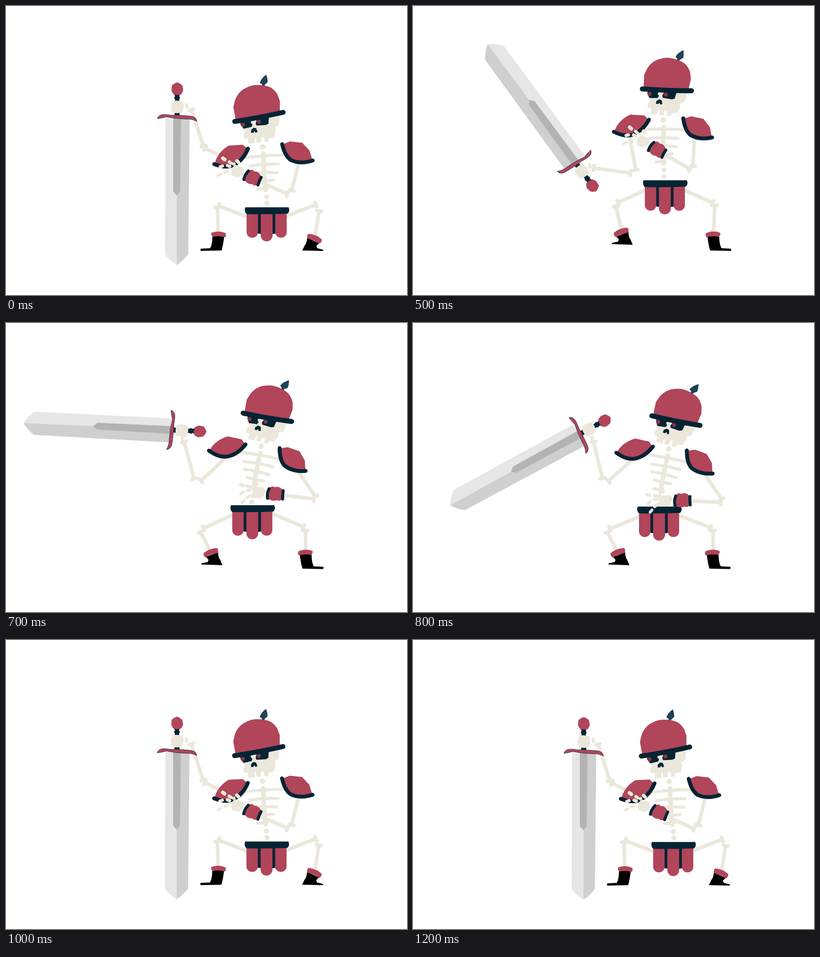
Recreate the animation shown at these times as an HTML page. Size 880 px wide and 636 px high, loop 1.3 s.

```html
<!DOCTYPE html>
<html lang="en">
<head>
<meta charset="utf-8">
<title>Skeleton knight</title>
<style>
  html, body { margin: 0; height: 100%; overflow: hidden; background: #fff; }
  svg { display: block; width: 100vw; height: 100vh; }
  .bone { fill: #ebe7db; }
  .line, .bones { fill: none; stroke: #ebe7db; stroke-width: 7; stroke-linecap: round; stroke-linejoin: round; }
  .bones { stroke-width: 8; }
  .red { fill: #b1455a; }
  .navy { fill: #042434; }
  .trim { fill: none; stroke: #042434; stroke-width: 8.5; stroke-linecap: round; stroke-linejoin: round; }
</style>
</head>
<body>
<!-- data-pose on a group: x y [angle [mirror]]; on a bone: x1 y1 x2 y2. The first pose is the drawn one. -->
<svg viewBox="0 0 880 636">
<g id="knight">
  <!-- legs -->
  <path class="bones" data-pose="540 468 467 440|525 404 461 429|510 399 439 436|505 419 433 452|502 428 431 454"/>
  <path class="bones" data-pose="464 443 466 500|456 438 461 497|434 444 454 488|427 460 449 503|426 460 448 503"/>
  <path class="bones" data-pose="605 466 680 437|593 404 658 432|582 400 657 434|576 416 653 449|576 425 653 452"/>
  <path class="bones" data-pose="687 451 678 508|661 438 659 497|663 440 661 497|657 457 658 505|659 456 660 505"/>

  <g data-pose="466.5 502|657 502 0 -1|660 502 0 -1|657 504.5 0 -1|657 504.5 0 -1">
    <path d="M453 505H479Q477 525 473 538L428 539Q425 536 428 534L448 533Q453 525 453 505Z"/>
    <path class="red" d="M451 499Q466 493 482 500Q484 505 481 509Q467 505 454 508Q449 504 451 499Z"/>
  </g>
  <g data-pose="677 511|460 503 3 -1|453.5 491 3 -1|449.5 504.5 3 -1|449.5 504.5 3 -1">
    <path d="M661 510L687 522L681 528L683 533L695 536Q698 538 695 539L650 538L656 526Q660 522 661 510Z"/>
    <path class="red" d="M664 501Q682 503 693 514Q693 520 688 523Q677 515 662 512Q659 505 664 501Z"/>
  </g>

  <!-- torso -->
  <g data-pose="564 322|548 262|551 264 8|558 283 14|560 295 15.5">
    <path class="line" style="stroke-width:10" d="M565 325Q565 365 570 405"/>
    <path class="line" style="stroke-width:6.5" d="M523 334Q565 328 610 328M535 352Q570 347 598 348M540 368Q570 365 595 367M550 384Q570 385 587 383M553 403L574 401"/>
    <circle class="bone" cx="563" cy="310" r="6"/>
    <circle class="bone" cx="572" cy="420" r="5.5"/>
    <circle class="bone" cx="573" cy="434" r="5.5"/>
  </g>

  <!-- upper arms -->
  <path class="bones" data-pose="490 340 437 313|483 286 498 374|466 276 480 348|484 295 428 347|484 301 429 349"/>
  <path class="bones" data-pose="645 335 627 406|609 271 592 346|627 290 637 359|638 322 679 382|636 332 675 394"/>

  <g data-pose="572.5 450|559.5 389|547 392|541 408|540 414">
    <path class="navy" d="M550 455H596V500Q573 505 550 500Z"/>
    <path class="red" d="M528 456H553V498A12.5 12 0 0 1 528 498ZM559 456H585V505A13 13 0 0 1 559 505ZM591 456H616V498A12.5 12 0 0 1 591 498Z"/>
    <path class="navy" d="M525 443H620Q624 451 618 457Q573 459 528 458Q522 452 525 443Z"/>
  </g>

  <!-- head -->
  <g data-pose="555 244|545.5 182 6.5|569 187 19.1|573.5 207.5 20.5|580.5 222 23.5">
    <path class="bone" d="M514 252L516 267L525 276Q518 284 523 291L531 292L532 303L546 302L546 290L549 290L550 301L560 300V289H566L567 299H576L577 291L588 289L592 275L590 267L599 261L600 240Z"/>
    <path class="navy" d="M514 254L539 249L537 257L541 261L539 266L522 270L515 262ZM551 247L577 242L576 259L570 262L550 263L548 259Z"/>
    <path class="navy" d="M538 273L543 268L549 269L552 277L548 279L545 275L543 279H538Z"/>
    <g fill="#8b3346"><circle cx="520" cy="261" r="4.5"/><circle cx="555" cy="254.5" r="4.5"/></g>
    <path fill="#1f4257" d="M571 151Q575 162 574 168L568 173L567 179H561L562 172L557 169Q560 159 571 151Z"/>
    <path class="red" d="M504 250L499 223L502 209Q505 199 512 191Q518 184 527 180Q536 175 546 174Q556 173 566 175Q575 176 582 180Q591 186 596 195L601 209L601 233Z"/>
    <path class="trim" style="stroke-width:11" d="M502 254Q556 246 608 234"/>
  </g>

  <!-- shoulder plates -->
  <g data-pose="494 331|477.5 268.5|481 258.5 11.3|485.5 274 15|487 283.5 15.6">
    <path class="red" d="M458 347Q464 322 489 307L520 305.5L531 315Q515 350 486 355Z"/>
    <path class="trim" d="M457 348Q486 359 503 348Q521 338 531 314"/>
  </g>
  <g data-pose="640 322|623.5 260.5|627 276 10.8|629.5 300.5 13|630 311.5 14">
    <path class="red" d="M606 305L623 298L650 301L666 318L672 338Q640 350 622 338Z"/>
    <path class="trim" d="M606 304Q612 330 625 339Q646 349 673 340"/>
  </g>

  <!-- sword arm -->
  <path class="bones" data-pose="407 228 433 308|396 398 491 381|397 315 464 354|391 262 413 343|401 261 418 341"/>
  <g data-pose="396 219|384 399|391 304|387 256|398 251">
    <path class="line" d="M396 217L397 222"/>
  </g>
  <g data-pose="376 222|368.5 412 154.9|372 316 132|386 237 92.6|386.5 231 29.5">
    <path fill="#e6e6e6" d="M350 246H376V570Q360 562 349 546Z"/>
    <path fill="#cfcfcf" d="M375 246L403 249L400 546Q389 561 375 570Z"/>
    <path fill="#b3b3b3" d="M367 245L384 247L382 408L375 417L367 408Z"/>
    <path class="navy" d="M370 233H381V242H370ZM369 194H382L380 198L382 202L380 206L381 211H370L371 206L369 202L371 198Z"/>
    <path fill="#b1455a" stroke="#042434" stroke-width=".8" d="M332 248C335 239 343 238 352 239Q363 241 375 240L403 242Q418 243 419 254Q408 248 395 249Q372 248 352 244Q341 247 332 248Z"/>
    <path class="red" d="M376 168Q382 170 387 175L389 186L385 194L377 196L367 194L363 186L364 175Q369 170 376 168Z"/>
    <path class="bone" d="M365 209Q376 207 388 210L390 221L387 234Q376 238 364 234L362 222Z"/>
  </g>

  <!-- free arm -->
  <path class="bones" data-pose="541 379 618 414|513 306 581 354|559 328 635 364|591 377 676 387|591 405 674 402"/>
  <g data-pose="541 379|512.5 306 12.5|559 328 -1|591 377 -18.5|591.5 406 -29.5">
    <path class="bone" d="M502 349L521 356L523 364L515 375Q506 379 495 372V358Z"/>
    <path class="line" style="stroke-width:8" d="M476 335L480 338M507 341L510 344"/>
    <path class="line" d="M490 343L494 346M486 351L491 353M470 354L475 352"/>
    <path class="line" style="stroke-width:6" d="M466 373L472 370M480 366L486 364M499 348L501 347"/>
    <path class="red" d="M533 362Q541 358 545 364Q553 363 559 373L553 393Q546 398 540 392Q531 393 524 384Z"/>
    <path class="trim" style="stroke-width:6.5" d="M532 363Q524 371 522 382M560 377Q556 384 553 394"/>
  </g>
</g>
</svg>
<script>
const STEP = 100;
// Pose held during each step; halves lie midway between two poses.
const timeline = [0, 0, 0, 0, 1, 1.5, 2, 3, 3.5, 4, 0, 0, 0];

const knight = document.getElementById('knight');
const parts = [...knight.querySelectorAll('[data-pose]')].map(el => ({
  el,
  poses: el.dataset.pose.split('|').map(pose => pose.split(' ').map(Number)),
}));

function blend(poses, index) {
  const from = poses[Math.floor(index)], to = poses[Math.ceil(index)];
  const value = (pose, i) => pose[i] ?? (i === 3 ? 1 : 0);
  return [0, 1, 2, 3].map(i =>
    value(from, i) + (value(to, i) - value(from, i)) * (index % 1));
}

// A shaft with a short crossbar at each end, which reads as a pair of knobs.
function bonePath([x1, y1, x2, y2]) {
  const length = Math.hypot(x2 - x1, y2 - y1);
  const nx = (y1 - y2) / length * 5, ny = (x2 - x1) / length * 5;
  const knobs = (x, y) => `M${x - nx} ${y - ny}L${x + nx} ${y + ny}`;
  return `M${x1} ${y1}L${x2} ${y2}` + knobs(x1, y1) + knobs(x2, y2);
}

function draw(step) {
  for (const { el, poses } of parts) {
    const pose = blend(poses, timeline[step]);
    if (el.tagName === 'path') {
      el.setAttribute('d', bonePath(pose));
    } else {
      const [x, y, angle, mirror] = pose, [px, py] = poses[0];
      el.setAttribute('transform',
        `translate(${x} ${y}) rotate(${angle}) scale(${mirror} 1) translate(${-px} ${-py})`);
    }
  }
  const settle = Math.max(0, step - 9);
  knight.setAttribute('transform', `translate(${-0.3 * settle} ${0.5 * settle})`);
}

const start = performance.now();
function tick() {
  draw(Math.floor((performance.now() - start) / STEP) % timeline.length);
  requestAnimationFrame(tick);
}
tick();
</script>
</body>
</html>
```
